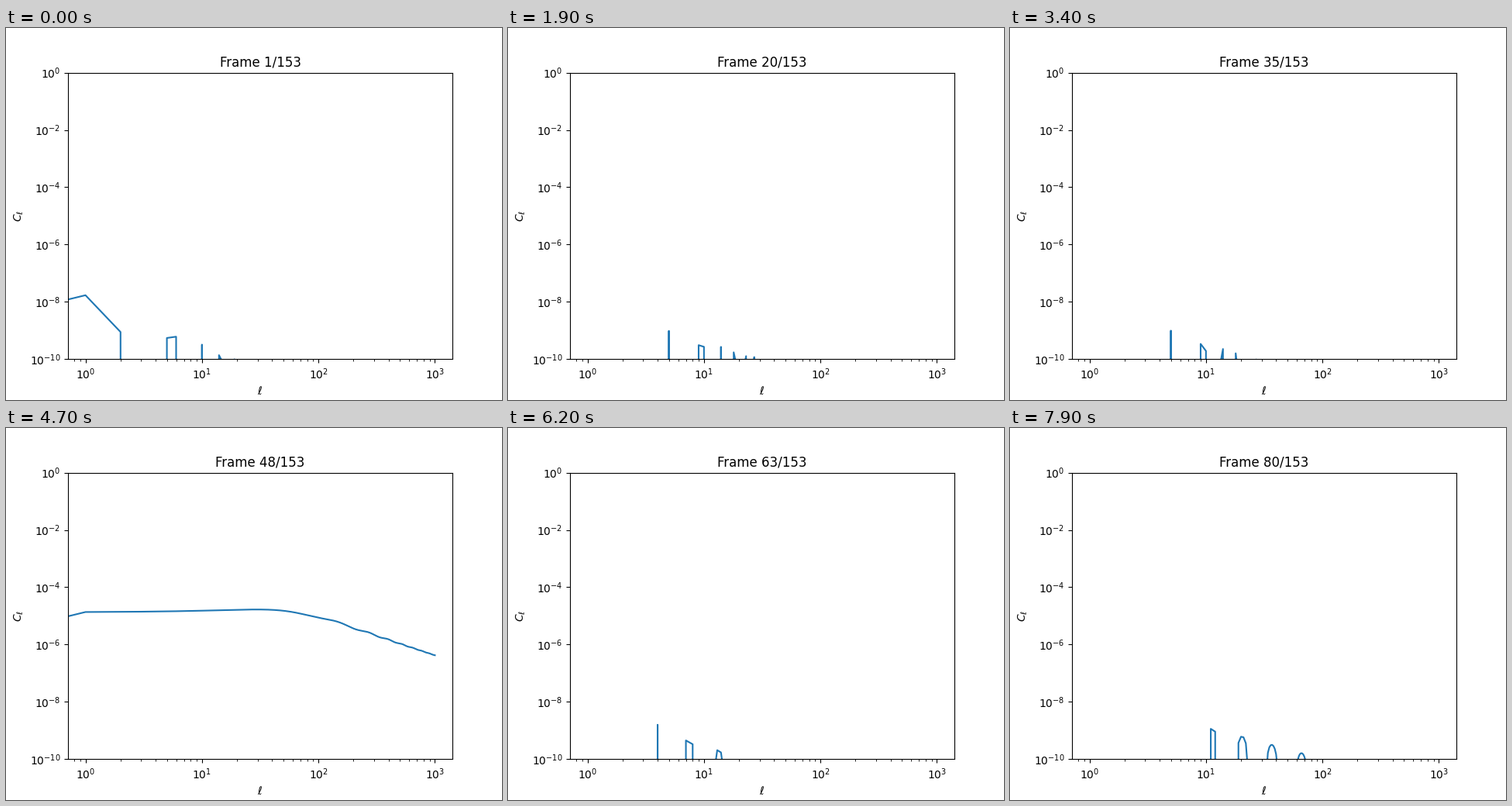
Recreate the animation shown at these times as a matplotlib script. Size 640 px wide and 480 px high, loop 8000 ms.

```python
import numpy as np
import matplotlib.pyplot as plt
from matplotlib.animation import FuncAnimation

FRAMES, INTERVAL, TOTAL, BINS = 80, 100, 153, 17
PAIRS = [(i, j) for i in range(BINS) for j in range(i, BINS)][1:]
# Per first bin: a bin gap and the multipole of its first bump
FIRST_BUMP = [(1, 1.2), (3, 5.1), (2, 5), (8, 24.2), (7, 11.4), (5, 11.4)]
ell = np.arange(1001)
safe = np.maximum(ell, 1)


def auto(i):
    """Rising plateau, power-law tail and damped acoustic wiggles."""
    scale = (i + 4.5) / 7.5
    l = safe / scale
    smooth = 10 ** -4.872 * (1 + l / 70) / (1 + (l / 65.8) ** 2.275)
    damping = np.exp(-l / 400) * (1 - np.exp(-(l / 70) ** 2))
    wiggle = 0.045 * damping * np.cos(2 * np.pi * (l - 147) / 125)
    return smooth * 10 ** wiggle * scale ** -3.2


def cross(i, gap):
    """Decaying wave: even spacing for near bins, geometric for far ones."""
    ref_gap, peak = FIRST_BUMP[i]
    if i < 3:
        turns = (safe - peak) / 4.4
        height = 60 + 120 / gap ** 2
    else:
        turns = np.log(safe / peak) / np.log(1.8)
        height = 200
    turns = turns + 0.38 * (gap - ref_gap)
    wave = (np.cos(2 * np.pi * turns) - 0.3) / 0.7
    size = 1e-10 * height * safe ** -(1 + 0.75 / gap)
    return np.where(ell >= 0.75 * peak * gap / ref_gap, size * wave, 0)


def spectrum(n):
    i, j = PAIRS[n]
    c = auto(i) if i == j else cross(i, j - i)
    c[0] = 0
    return c


fig, ax = plt.subplots(figsize=(6.4, 4.8), dpi=100)
line, = ax.loglog(ell, spectrum(0))
ax.set_xlim(10 ** -0.15, 10 ** 3.15)
ax.set_ylim(1e-10, 1)
ax.set_xlabel(r"$\ell$")
ax.set_ylabel(r"$C_\ell$")
title = ax.set_title(f"Frame 1/{TOTAL}")


def update(n):
    line.set_ydata(spectrum(n))
    title.set_text(f"Frame {n + 1}/{TOTAL}")
    return line, title


anim = FuncAnimation(fig, update, frames=FRAMES, interval=INTERVAL,
                     repeat=True, repeat_delay=0)
plt.show()
```
